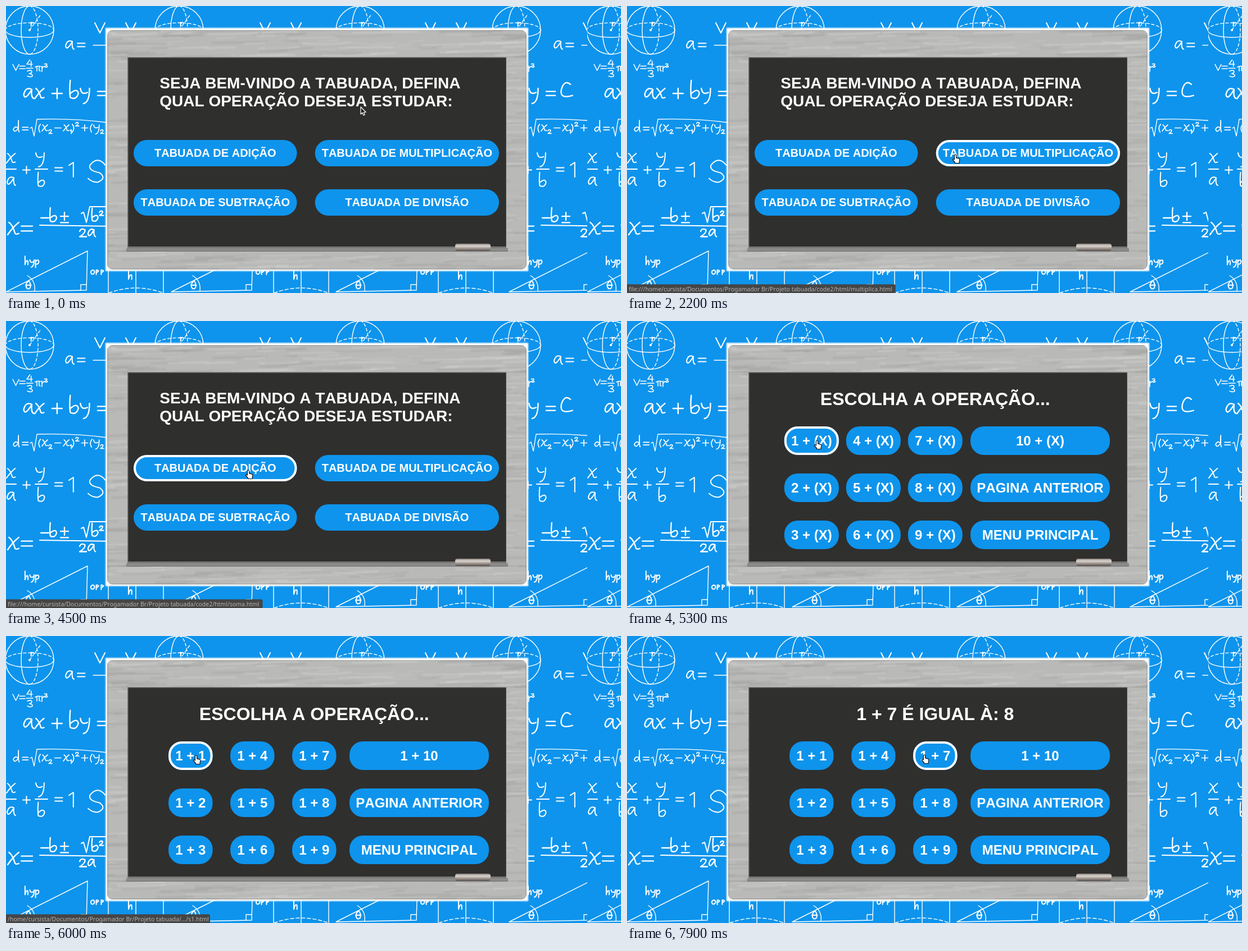
These frames come from a looping animation (1094 px wide and 512 px high, 8000 ms). An HTML page with a canvas:

```html
<!DOCTYPE html>
<html lang="pt">
<head>
<meta charset="utf-8">
<title>Tabuada</title>
<style>
html, body { margin: 0; width: 100%; height: 100%; overflow: hidden; background: #0e94ec; }
canvas { display: block; }
</style>
</head>
<body>
<canvas id="stage" width="1094" height="512"></canvas>
<script>
const W = 1094, H = 512, LOOP = 8000, BLUE = '#0e94ec';
const stage = document.getElementById('stage').getContext('2d');
const scene = document.createElement('canvas');
scene.width = W;
scene.height = H;

// Handwritten strokes: x-height from 0 to 10, baseline at 10.
const GLYPHS = {
  a: 'M8 1Q2-2 0 6Q1 13 8 1Q7 9 10 10',
  b: 'M1-8Q0 2 1 9Q7 12 9 5Q8-1 1 5',
  d: 'M8 5Q4-1 0 6Q2 13 8 4L8-8Q7 6 9 10',
  h: 'M1-8V10Q4-2 7 3V10',
  p: 'M1 0V16M1 3Q7-3 8 4Q6 11 1 8',
  r: 'M1 0V10M1 5Q3 0 7 1',
  x: 'M1 0Q4 2 6 9Q7 10 9 9M9 0Q4 4 0 10',
  y: 'M0 0Q1 7 7 4M9 0Q9 14 3 15',
  C: 'M10-4Q4-9 1 1Q-1 11 12 7',
  O: 'M5 0Q-1 1 0 6Q3 13 8 6Q9 1 4 0',
  P: 'M1 0V10M1 0Q11 1 1 6',
  S: 'M9 2Q5-3 1 2Q0 5 6 6Q10 9 5 11Q2 11 0 9',
  V: 'M0 0L5 10L10 0',
  1: 'M0 2L3 0V10',
  2: 'M0 3Q2-2 7 1Q8 5 0 10H9',
  3: 'M0 1Q8-2 7 3Q6 5 3 5Q11 7 7 10Q3 11 0 9',
  4: 'M5 0L0 7H9M7 2V11',
  'π': 'M0 2Q4-1 10 1M3 1V9M7 1V8L9 9',
  'θ': 'M4-1Q-2 4 2 10Q8 12 7 4Q6-1 4-1M0 5H8',
  '(': 'M3-1Q-2 5 2 12',
  ')': 'M0-1Q5 5 0 12',
  '+': 'M0 5H10M5 0V10',
  '-': 'M0 5H10',
  '=': 'M0 3H9M0 7H9',
  '±': 'M0 3H10M5-2V8M0 11H10'
};

function drawScene(c) {
  const line = (d, dash = []) => {
    c.setLineDash(dash);
    c.stroke(new Path2D(d));
    c.setLineDash([]);
  };

  // "_" lowers and "^" raises the next glyph.
  function write(text, x, y, size, weight = 2) {
    let shift = 0;
    for (const ch of text) {
      if (ch === ' ') { x += 3 * size; continue; }
      if (ch === '_' || ch === '^') { shift = ch === '_' ? 8 : -4; continue; }
      const s = shift ? size * 0.6 : size;
      c.save();
      c.translate(x, y + shift * size);
      c.scale(s, s);
      c.lineWidth = weight / s;
      c.stroke(new Path2D(GLYPHS[ch]));
      c.restore();
      x += ('()1r'.includes(ch) ? 5.5 : 11) * s;
      shift = 0;
    }
  }

  const at = (xs, draw) => xs.forEach(x => {
    c.save();
    c.translate(x, 0);
    draw();
    c.restore();
  });

  function sphere() {
    line('M-43 43A43 43 0 1 1 43 43A43 43 0 1 1-43 43');
    line('M-43 43A43 13 0 0 0 43 43M0 0A15 43 0 0 0 0 86');
    line('M-43 43A43 13 0 0 1 43 43M0 0A15 43 0 0 1 0 86M0 43L20 15', [5, 4]);
    c.beginPath();
    c.arc(0, 43, 2, 0, 7);
    c.fill();
    write('r', 2, 29, 0.7);
  }

  function triangle() {
    line('M0 510L145 437L143 507ZM133 507V497H143M38 481Q53 490 51 508');
    write('hyp', 33, 453, 0.85);
    write('θ', 35, 492, 1.2);
    write('OPP', 151, 471, 0.8);
  }

  function cylinder() {
    line('M182 470V512M231 470V512M280 470V512');
    line('M183 512Q231 494 280 512', [6, 4]);
    write('h', 217, 478, 0.95);
  }

  function tile() {
    c.save();
    c.beginPath();
    c.rect(0, 0, 1034, H);
    c.clip();
    c.strokeStyle = c.fillStyle = '#fff';
    c.lineCap = c.lineJoin = 'round';
    c.lineWidth = 1.4;
    at([42, 308, 630, 908], sphere);
    at([0, 294, 587, 895], triangle);
    at([0, 294, 587], cylinder);
    at([158, 213, 452, 507, 746, 801, 1027], () => write('V', 0, 30, 1.8));
    at([0, 869], () => {
      write('a =', 106, 62, 1.5);
      line('M155 70H200');
    });
    at([0, 866], () => {
      write('V=', 12, 104, 1.1, 1.6);
      write('4', 37, 96, 1.1, 1.6);
      line('M36 111H48');
      write('3', 38, 115, 1.1, 1.6);
      write('πr^3', 52, 107, 1, 1.6);
    });
    at([0, 798], () => write('ax  +  by  = C', 31.5, 147, 1.8, 2.4));
    at([0, 888], () => {
      write('d =', 13, 213, 1.15, 1.7);
      line('M43 218L46 216L50 232L55 202Q120 200 180 208');
      write('(x_2 - x_1)^2 + (y_2', 58, 212, 1.1, 1.7);
    });
    at([0, 892], () => {
      c.lineWidth = 2;
      write('x', 1, 263, 1.7);
      write('a', 2, 305, 1.5);
      write('+', 30, 286, 1.3);
      write('y', 53, 262, 1.65);
      write('b', 56, 308, 1.4);
      write('=', 87, 284, 1.5);
      write('1', 112, 279, 2.6);
      write('S', 146, 277, 3.4);
      line('M0 291H18M52 291H74M60 391L190 393');
      write('x=', 3, 386, 2.2, 2.4);
      write('-b ±', 62, 371, 1.4, 2.3);
      line('M134 370L138 368L143 386L149 358H190');
      write('b^2', 152, 371, 1.3, 2.3);
      write('2a', 131, 398, 1.35, 2.3);
    });
    c.restore();
  }

  function board() {
    c.filter = 'blur(1px)';
    c.fillStyle = '#fff';
    c.fillRect(177, 39, 752, 434);
    c.filter = 'none';
    c.save();
    c.beginPath();
    c.roundRect(180, 43, 746, 427, 9);
    c.clip();
    c.fillStyle = '#b9b9b7';
    c.fillRect(180, 42, 747, 429);
    let seed = 7;
    const random = () => (seed = seed * 16807 % 2147483647) / 2147483647;
    c.filter = 'blur(1px)';
    for (let i = 0; i < 700; i++) {
      const x = 120 + random() * 800, y = 42 + random() * 429;
      const length = 30 + random() * 90;
      c.strokeStyle = random() < 0.5 ? 'rgba(222,222,220,.3)' : 'rgba(140,140,140,.22)';
      c.lineWidth = 1 + random() * 3;
      c.beginPath();
      c.moveTo(x, y);
      c.quadraticCurveTo(x + length / 2, y + random() * 8 - 4, x + length, y - 2);
      c.stroke();
    }
    c.filter = 'none';
    c.strokeStyle = 'rgba(100,100,100,.25)';
    c.lineWidth = 3;
    c.strokeRect(180, 43, 746, 427);
    c.lineWidth = 1;
    line('M180 91H217M890 91H927M180 437H217M890 437H927');
    c.restore();

    c.fillStyle = '#777776';
    c.fillRect(216, 91, 674, 346);
    c.fillStyle = '#2f2f2e';
    c.fillRect(217.5, 92.5, 672, 336.5);
    c.fillStyle = '#8b8b8a';
    c.fillRect(214, 432, 679, 5);
    c.fillStyle = '#6c6c6b';
    c.fillRect(214, 437, 679, 1);
    const chalk = c.createLinearGradient(0, 424, 0, 438);
    chalk.addColorStop(0, '#8d857e');
    chalk.addColorStop(0.3, '#dcd6d0');
    chalk.addColorStop(0.65, '#968c86');
    chalk.addColorStop(1, '#4a4340');
    c.fillStyle = chalk;
    c.beginPath();
    c.roundRect(799, 424, 63, 13, 4);
    c.fill();
  }

  c.fillStyle = BLUE;
  c.fillRect(0, 0, W, H);
  tile();
  at([1034], tile);
  board();
}

const menu = [
  ['TABUADA DE ADIÇÃO', 227, 239, 290.5, 47],
  ['TABUADA DE SUBTRAÇÃO', 227, 327, 290.5, 47],
  ['TABUADA DE MULTIPLICAÇÃO', 549.7, 239, 327.3, 47],
  ['TABUADA DE DIVISÃO', 549.7, 327, 327.3, 47]
];

function numberPage(label, width) {
  const buttons = [];
  for (let n = 1; n <= 9; n++) {
    const center = 328.3 + 110 * Math.floor((n - 1) / 3);
    buttons.push([label(n), center - width / 2, 188 + 84 * ((n - 1) % 3), width, 51]);
  }
  [label(10), 'PAGINA ANTERIOR', 'MENU PRINCIPAL'].forEach((text, row) =>
    buttons.push([text, 611, 188 + 84 * row, 248, 51]));
  return buttons;
}

const pages = [menu, numberPage(n => n + ' + (X)', 97), numberPage(n => '1 + ' + n, 78.5)];

// time, x, y, hand
const cursorKeys = [
  [0, 631, 180, 0], [100, 626, 188, 0], [200, 614, 214, 0], [300, 600, 243, 1],
  [400, 590, 258, 1], [500, 586, 264, 1], [800, 585, 264, 1], [900, 584, 265, 1],
  [3700, 567, 265, 1], [3800, 535, 268, 0], [3900, 500, 270, 1], [4000, 465, 270, 1],
  [4100, 440, 268, 1], [4200, 431, 266, 1], [4900, 431, 266, 0], [5100, 420, 262, 0],
  [5200, 378, 241, 0], [5300, 338, 213, 1], [6200, 362, 212, 1], [6300, 384, 210, 0],
  [6400, 440, 208, 1], [6500, 540, 205, 1], [6600, 600, 202, 1], [6700, 628, 204, 1],
  [6800, 618, 206, 1], [6900, 565, 210, 1], [7000, 499, 214, 0], [7100, 521, 212, 1],
  [7900, 529, 212, 1]
];

const home = '/home/cursista/Documentos/Progamador Br/';
const full = name => 'file://' + home + 'Projeto tabuada/code2/html/' + name;
const statusKeys = [
  [0, ''],
  [700, home + '.../multiplica.html'],
  [2100, full('multiplica.html')],
  [3900, ''],
  [4000, home + 'Projeto tabuada/.../soma.html'],
  [4500, full('soma.html')],
  [5200, ''],
  [5400, home + 'Projeto tabuada/.../s1.html'],
  [6100, '']
];

const HAND = new Path2D('M-1.6 1Q0-1 1.6 1V6L6.5 7.2Q8 7.6 7.8 9.5L7 13.5V15.5H-.5V14L-4.5 9.5Q-5 7.5-3 8L-1.6 9Z');
const ARROW = new Path2D('M0 0V13L3 10.3L5 15L7.3 14L5.3 9.5H9.3Z');
const lastKey = (keys, t) => keys.findLastIndex(key => key[0] <= t);

function label(text, x, y, size, align = 'center') {
  stage.font = `bold ${size}px "Liberation Sans", Arial, sans-serif`;
  stage.fontKerning = 'none';
  stage.textAlign = align;
  stage.fillStyle = '#fff';
  stage.fillText(text, x, y);
}

function drawButton([text, x, y, w, h], size, hovered) {
  stage.fillStyle = BLUE;
  stage.beginPath();
  stage.roundRect(x, y, w, h, 24);
  stage.fill();
  if (hovered) {
    stage.strokeStyle = '#fff';
    stage.lineWidth = 4;
    stage.beginPath();
    stage.roundRect(x + 2, y + 2, w - 4, h - 4, 22);
    stage.stroke();
  }
  label(text, x + w / 2, y + 12 + Math.round(size * 0.905), size);
}

function drawStatus(t, dark) {
  const index = lastKey(statusKeys, t);
  const [start, text] = statusKeys[index];
  if (!text) return;
  const appearing = !statusKeys[index - 1][1];
  stage.globalAlpha = appearing ? Math.min(1, (t - start + 80) / 200) : 1;
  stage.font = '10.5px "Noto Sans", sans-serif';
  stage.textAlign = 'left';
  const width = text.startsWith('file') ? stage.measureText(text).width + 9 : 363;
  stage.fillStyle = dark ? '#080808' : '#454545';
  stage.beginPath();
  stage.roundRect(0, 496.5, width, 16, [0, 3, 0, 0]);
  stage.fill();
  stage.fillStyle = dark ? '#f0a63c' : '#b8b5b2';
  stage.fillText(text, 3, 508.5);
  stage.globalAlpha = 1;
}

function drawCursor(x, y, hand) {
  stage.save();
  stage.translate(x, y);
  stage.lineJoin = 'round';
  stage.lineWidth = 1.2;
  stage.fillStyle = hand ? '#fff' : '#222';
  stage.strokeStyle = hand ? '#111' : '#fff';
  stage.fill(hand ? HAND : ARROW);
  stage.stroke(hand ? HAND : ARROW);
  stage.restore();
}

function render(now) {
  const t = Math.floor(now % LOOP / 100) * 100;
  const page = t < 4700 ? 0 : t < 5800 ? 1 : 2;
  const loading = t >= 4700 && t < 4900 || t >= 5800 && t < 6000;
  const pressed = t === 7300;
  const [, x, y, hand] = cursorKeys[lastKey(cursorKeys, t)];

  stage.fillStyle = BLUE;
  stage.fillRect(0, 0, W, H);
  if (!loading) stage.drawImage(scene, 0, 0);

  if (page === 0) {
    label('SEJA BEM-VINDO A TABUADA, DEFINA', 273.3, 147, 28, 'left');
    label('QUAL OPERAÇÃO DESEJA ESTUDAR:', 273.3, 179, 28, 'left');
  } else {
    label(t < 7400 ? 'ESCOLHA A OPERAÇÃO...' : '1 + 7 É IGUAL À: 8', 548.3, 150, 32);
  }
  for (const button of pages[page]) {
    const [, left, top, w, h] = button;
    const inside = x >= left && x < left + w && y >= top && y < top + h;
    drawButton(button, page ? 24 : 20, inside && !loading && !pressed);
  }
  drawStatus(t, loading);
  drawCursor(x, y, hand);
  requestAnimationFrame(render);
}

drawScene(scene.getContext('2d'));
requestAnimationFrame(render);
</script>
</body>
</html>
```
